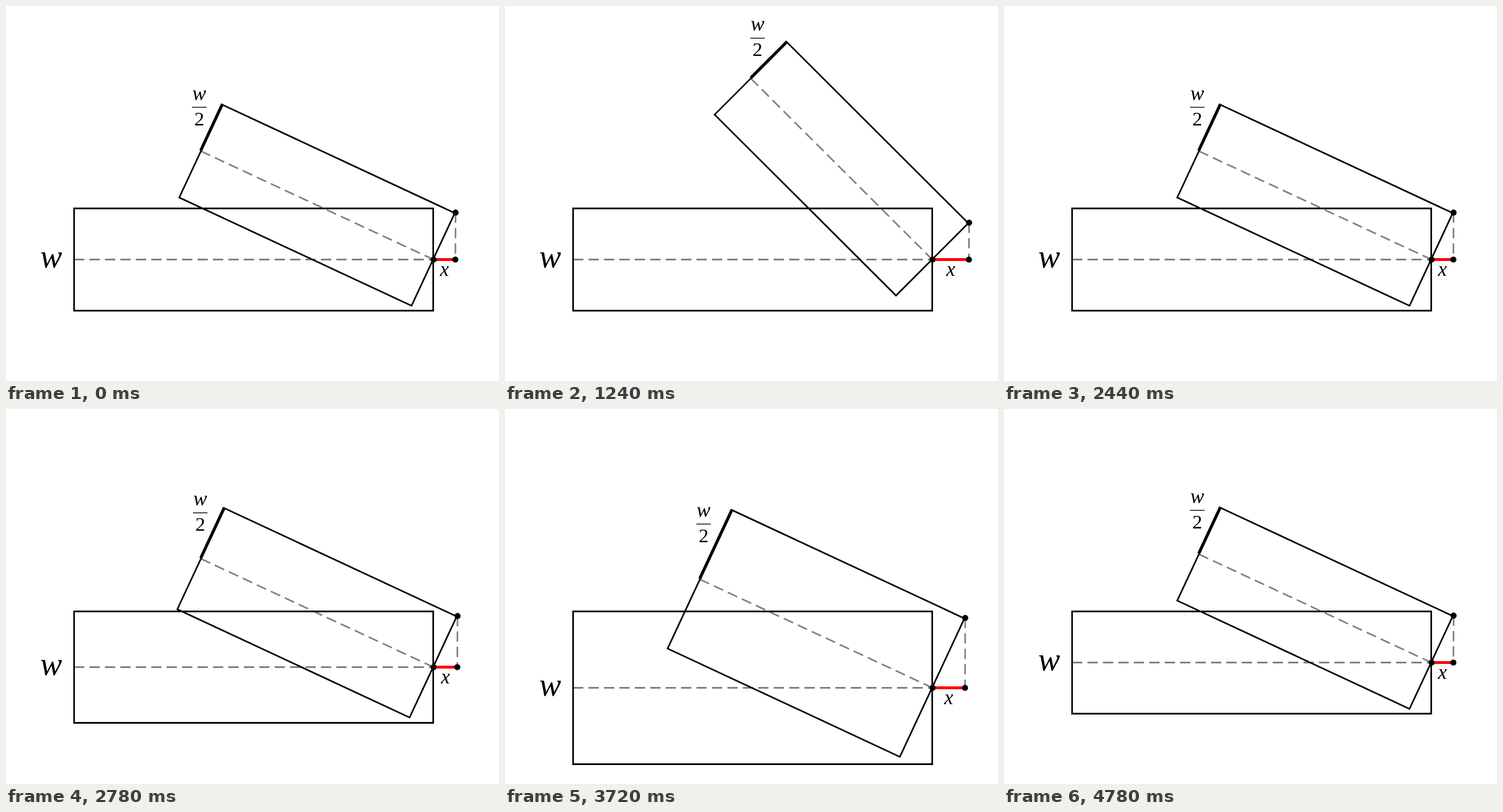
An HTML page for the animation above (4800 ms loop, 858x653 px).

```html
<!DOCTYPE html>
<html>
<head>
<meta charset="utf-8">
<style>
  html, body { margin: 0; width: 100%; height: 100%; overflow: hidden; background: #fff; }
  svg { display: block; width: 858px; height: 653px; }
  .edge { fill: none; stroke: #000; stroke-width: 2.78; }
  .dash { stroke: #808080; stroke-width: 2.78; stroke-dasharray: 17.9 8.95; }
  .bold { stroke: #000; stroke-width: 5.2; }
  .gap { stroke: #f00; stroke-width: 5.2; }
  text { font-family: "Liberation Serif", "Times New Roman", serif; text-anchor: middle; }
  .var { font-style: italic; }
</style>
</head>
<body>
<svg viewBox="0 0 858 653">
  <line id="axis" class="dash"/>
  <line id="tiltAxis" class="dash"/>
  <line id="drop" class="dash"/>
  <path id="base" class="edge"/>
  <path id="tilted" class="edge"/>
  <line id="half" class="bold"/>
  <line id="gap" class="gap"/>
  <circle id="pivot" r="5.3"/>
  <circle id="foot" r="5.3"/>
  <circle id="corner" r="5.3"/>
  <text id="width" class="var" font-size="57">w</text>
  <text id="offset" class="var" font-size="35">x</text>
  <g id="fraction">
    <text class="var" font-size="36" y="-12.8">w</text>
    <line x1="-12.6" x2="12.6" stroke="#000" stroke-width="1.4"/>
    <text font-size="34.5" y="31.3">2</text>
  </g>
</svg>
<script>
const LOOP = 4800, RAMP = 1200, STEP = 20;
const LEFT = 118.3, RIGHT = 743.4, TOP = 352.2, LENGTH = 446;
const el = id => document.getElementById(id);

function set(id, attrs) {
  for (const k in attrs) el(id).setAttribute(k, attrs[k]);
}
const line = (id, [x1, y1], [x2, y2]) => set(id, { x1, y1, x2, y2 });
const dot = (id, [cx, cy]) => set(id, { cx, cy });
const box = (id, pts) => set(id, { d: "M" + pts.join("L") + "Z" });

// Upright lines sit on pixel centres.
const snap = v => Math.floor(v + 0.5) + 0.5;

// Quadratic ease up during one ramp and back down during the next.
function swing(t) {
  const p = Math.max(0, 1 - Math.abs(t / RAMP - 1));
  return p < 0.5 ? 2 * p * p : 1 - 2 * (1 - p) * (1 - p);
}

function draw(t) {
  const a = (25 + 20 * swing(t)) * Math.PI / 180;
  const h = 89.05 * (1 + 0.5 * swing(t - 2 * RAMP - STEP));
  const c = Math.cos(a), s = Math.sin(a);
  const y = TOP + h;
  // u runs along the tilted box to the left, v across it upwards
  const at = (u, v) => [RIGHT - u * c + v * s, y - u * s - v * c];

  const [l, r, top, mid, low] = [LEFT, RIGHT, TOP, y, y + h].map(snap);
  box("base", [[l, top], [r, top], [r, low], [l, low]]);
  box("tilted", [at(0, h), at(LENGTH, h), at(LENGTH, -h), at(0, -h)]);
  line("axis", [l, mid], [r, mid]);
  line("tiltAxis", at(LENGTH, 0), at(0, 0));
  line("half", at(LENGTH + 0.7, 0.8), at(LENGTH + 0.7, h + 1.2));

  const [cx, cy] = at(0, h);
  const pivot = [r + 0.7, mid], foot = [cx + 1, mid], corner = [cx + 1.4, cy - 0.9];
  line("gap", pivot, foot);
  line("drop", corner, foot);
  dot("pivot", pivot);
  dot("foot", foot);
  dot("corner", corner);

  set("width", { x: 78.5, y: y + 14 });
  set("offset", { x: (pivot[0] + foot[0]) / 2, y: y + 28.7 });
  const [mx, my] = at(LENGTH + 9, h / 2);
  set("fraction", { transform: `translate(${mx - 13.5} ${my - 32.2})` });
}

function tick() {
  const t = performance.now() % LOOP;
  draw(Math.floor(t / STEP) * STEP);
  requestAnimationFrame(tick);
}
tick();
</script>
</body>
</html>
```
